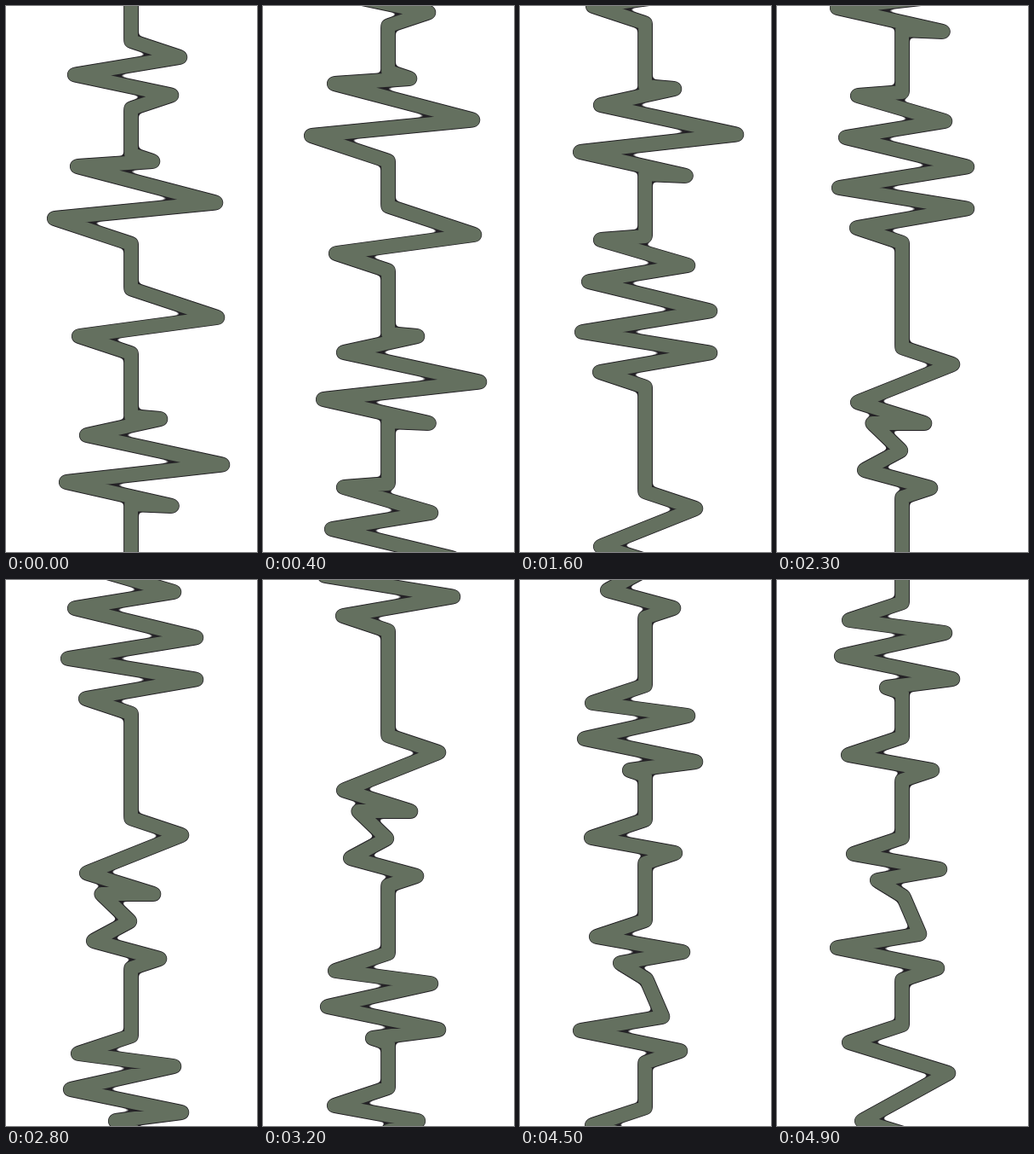
Recreate the animation shown at these times as an HTML page. Size 295 by 640 pixels, loop 5 s.

```html
<!DOCTYPE html>
<html>
<head>
<meta charset="utf-8">
<style>
html, body { margin: 0; width: 100%; height: 100%; overflow: hidden; background: #fff; }
svg { display: block; }
polyline { fill: none; stroke-linecap: round; stroke-linejoin: round; }
#edge { stroke: #242226; stroke-width: 17.9; filter: url(#fillet); }
#fill { stroke: #64705f; stroke-width: 15.9; }
</style>
</head>
<body>
<svg width="295" height="640" viewBox="0.4 0 295 640">
  <!-- blur and sharpen again, which fills the narrow inner corners -->
  <filter id="fillet" filterUnits="userSpaceOnUse" x="0" y="-20" width="296" height="1900" color-interpolation-filters="sRGB">
    <feGaussianBlur stdDeviation="2"/>
    <feComponentTransfer><feFuncA type="linear" slope="6" intercept="-2.5"/></feComponentTransfer>
  </filter>
  <g id="strip"><polyline id="edge"/><polyline id="fill"/></g>
</svg>
<script>
const LOOP = 5000, STEP = 100, SCROLL = 24.18;
const MID = 147.5;    // resting line
const REST_GAP = 65;  // peaks further apart than this have a rest between them
const SLOPE = 0.33;   // steepness of the way to and from rest

const peaks = [
  [MID, -20], [205, 60], [81, 80.5], [195, 104.5],
  [173, 182], [84, 188], [247, 230.5], [57, 249],
  [249, 365], [86, 387],
  [MID, 481], [182, 484], [95, 503], [255, 537.5], [71, 558], [195.5, 586], [MID, 584],
  [MID, 657], [95, 661], [198, 691], [81, 710], [224, 744.5], [73, 769], [224, 793.5], [94, 816],
  [207, 976], [95, 1020.5], [174, 1045], [112.5, 1045], [146, 1077], [103, 1100], [181, 1121],
  [85, 1232], [198, 1247], [76, 1274], [207, 1301], [129, 1311],
  [84, 1390], [183, 1408],
  [90, 1506], [192, 1524], [118, 1537], [149, 1556], [168, 1600], [71, 1616], [189, 1640],
  [85, 1727], [202, 1763], [100, 1819], [175, 1842]
];

const lead = x => SLOPE * Math.abs(x - MID);

const points = peaks.flatMap(([x, y], i) => {
  const [px, py] = peaks[i - 1] || [x, y];
  const rest = y - py > REST_GAP ? [[MID, py + lead(px)], [MID, y - lead(x)]] : [];
  return [...rest, [x, y]];
});
for (const line of document.querySelectorAll("polyline"))
  line.setAttribute("points", points.join(" "));

const strip = document.getElementById("strip");
function draw(now) {
  const step = Math.floor(now % LOOP / STEP);
  strip.setAttribute("transform", `translate(0 ${-Math.round(step * SCROLL)})`);
  requestAnimationFrame(draw);
}
draw(performance.now());
</script>
</body>
</html>
```
